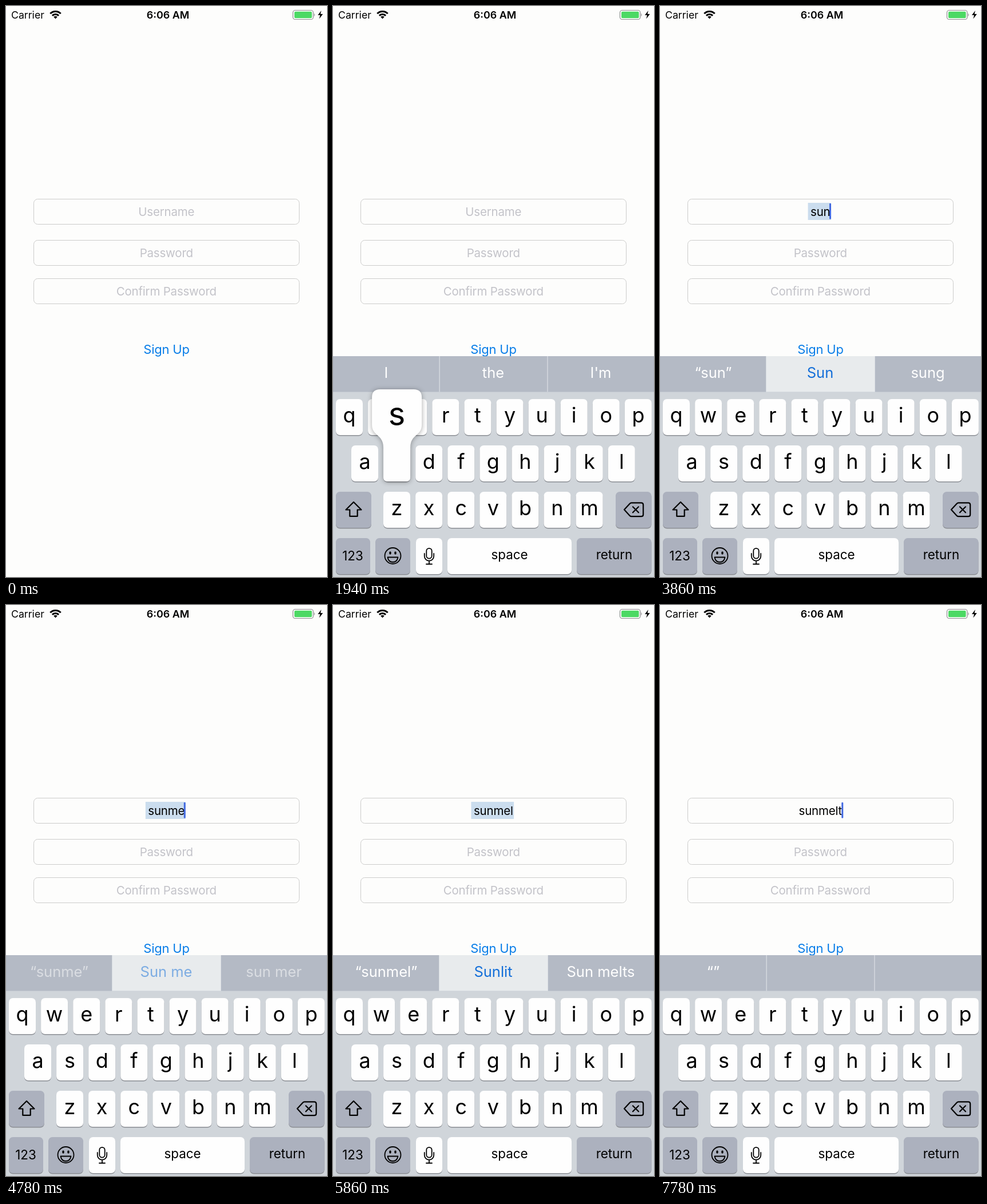
Write an HTML page that moves like this. It is 561x998 px and loops after 8 s.

```html
<!DOCTYPE html>
<html lang="en">
<head>
<meta charset="utf-8">
<title>Sign up form</title>
<style>
  html, body { margin: 0; width: 100%; height: 100%; overflow: hidden; background: #fdfdfc; }
  svg { display: block; }
  text { font-family: Inter, Roboto, sans-serif; text-anchor: middle; white-space: pre; }
  .field { fill: none; stroke: #cccccb; stroke-width: 1; }
  .input { font-size: 20.5px; letter-spacing: -.01em; }
  .letter { font-size: 36px; font-weight: 380; }
  .label { font-size: 22.4px; }
  .word { font-size: 25.5px; font-weight: 400; }
  .icon { fill: none; stroke: #000; stroke-width: 2.2; stroke-linejoin: round; stroke-linecap: round; }
  .popup { filter: drop-shadow(0 1px 4px rgba(0, 0, 0, .35)); }
</style>
</head>
<body>
<svg id="stage" width="561" height="998" viewBox="0 0 561 998"></svg>
<script>
const LOOP = 8000;
const WHITE = '#fefefe', GRAY = '#acb1be', HINT = '#c3c3c9';
const PITCH = 56.1, KEY_W = 47, KEY_H = 63;

// Letter keys: characters, left edge, top edge
const ROWS = [['qwertyuiop', 5, 687], ['asdfghjkl', 32, 768], ['zxcvbnm', 88, 849]];

// Key presses: time down, key
const PRESSES = [[1940, 's'], [2460, 'u'], [3400, 'n'], [4040, 'm'], [4600, 'e'], [5000, 'l'], [6060, 't']];
const HOLD = 100;
const RETURN = [6580, 6680];

// Suggestion bar: time, left, middle, right, middle is active
const BAR = [
  [0, 'I', 'the', "I'm"],
  [2040, '“s”', 'so', 'she'],
  [2560, '“su”', 'such', 'sure'],
  [3500, '“sun”', 'Sun', 'sung', true],
  [4140, '“sunm”', 'Sunny', 'sum', true],
  [4700, '“sunme”', 'Sun me', 'sun mer', true],
  [5100, '“sunmel”', 'Sunlit', 'Sun melts', true],
  [6160, '“sunmelt”', '', ''],
  [6900, '“”', '', '']
];

// Keyboard slide: time, distance below its resting place
const SLIDE = [[0, 400], [500, 300], [600, 90], [700, 27], [820, 0]];

// Moments at which the caret blink starts over
const CARET = [500, ...PRESSES.map(p => p[0] + HOLD), 6660];

const last = (list, t) => list.filter(item => item[0] <= t).pop();
const clamp = (v, lo, hi) => Math.min(hi, Math.max(lo, v));

const text = (x, y, s, cls, fill = '#000', extra = '') =>
  `<text x="${x}" y="${y}" class="${cls}" fill="${fill}" ${extra}>${s}</text>`;

const rect = (x, y, w, h, fill, r = 0, extra = '') =>
  `<rect x="${x}" y="${y}" width="${w}" height="${h}" rx="${r}" fill="${fill}" ${extra}/>`;

const key = (x, y, w, fill = WHITE, id = '') =>
  rect(x, y + 1.6, w, KEY_H, '#8b8e94', 7) + rect(x, y, w, KEY_H, fill, 7, id && `id="${id}"`);

const field = y => rect(48.5, y + .5, 464, 44, 'none', 7, 'class="field"');

function letterKeys() {
  return ROWS.map(([chars, left, y]) => [...chars].map((c, i) => {
    const x = left + i * PITCH;
    return key(x, y, KEY_W) + text(x + KEY_W / 2, y + 40.5, c, 'letter');
  }).join('')).join('');
}

function statusBar() {
  return text(9, 22, 'Carrier', '', '#000', 'style="text-anchor:start;font-size:17.7px"')
    + `<g fill="none" stroke="#000" stroke-width="3">
        <path d="M77.3 13.2a13 13 0 0 1 18.4 0M80.9 16.9a8 8 0 0 1 11.2 0"/>
        <path d="M86.5 22.5l-3.2-3.4a4.6 4.6 0 0 1 6.4 0z" fill="#000" stroke="none"/></g>`
    + text(283, 22, '6:06 AM', '', '#000', 'style="font-size:17.9px;font-weight:600"')
    + rect(501.5, 7.5, 35.5, 16, 'none', 4, 'stroke="#8d8d8f" stroke-width="1.2"')
    + rect(504, 9.8, 30.6, 11.4, '#4cd964', 2)
    + '<path d="M538.5 12.5q2.5 3 0 6z" fill="#8d8d8f"/>'
    + '<path d="M551 8l-6 8h4l-1.6 6.5 6.4-8.5h-4.2z"/>';
}

function controlKeys() {
  const y = 930;
  return key(5, 849, 62, GRAY) + key(494, 849, 62.5, GRAY)
    + key(5, y, 60, GRAY) + text(34.5, 969, '123', 'label')
    + key(74, y, 61, GRAY) + key(145, y, 46)
    + key(200, y, 217) + text(308.5, 967, 'space', 'label')
    + key(426, y, 130.5, GRAY, 'return') + text(491.5, 967, 'return', 'label');
}

function icons() {
  return `<g class="icon">
      <path d="M36 867l13.5 13.5h-6.8v11.3h-13.4v-11.3h-6.8z"/>
      <path d="M509 880.3l9.5-10.4q1.4-1.5 3.2-1.5h17q3.5 0 3.5 3.5v16.8q0 3.5-3.5 3.5h-17q-1.8 0-3.2-1.5zM524 875.3l10 10m0-10l-10 10"/>
      <circle cx="104.5" cy="961" r="14" stroke-width="1.8"/>
      <path d="M95.5 963.5h18q-1.5 8.5-9 8.5t-9-8.5z" stroke-width="1.8"/>
      <path d="M163.3 952.5a4.7 4.7 0 0 1 9.4 0v8.5a4.7 4.7 0 0 1-9.4 0zM159.8 957v4.5a8.2 8.2 0 0 0 16.4 0v-4.5M168 970v5.5m-5 0h10" stroke-width="1.8"/>
    </g>
    <ellipse cx="100" cy="956" rx="1.8" ry="2.8"/><ellipse cx="109" cy="956" rx="1.8" ry="2.8"/>`;
}

const stage = document.getElementById('stage');
stage.innerHTML = rect(0, 0, 561, 998, '#fdfdfc') + statusBar()
  + [337, 409, 476].map(field).join('')
  + rect(0, 344, 0, 30, '#cbddee', 0, 'id="mark"')
  + text(280.3, 367, 'Username', 'input', HINT, 'id="user"')
  + text(280.3, 439, 'Password', 'input', HINT)
  + text(280.3, 506, 'Confirm Password', 'input', HINT)
  + rect(0, 345, 3, 27.5, '#4269e0', 1, 'id="caret"')
  + text(280.5, 607.5, 'Sign Up', '', '#087de8', 'style="font-size:22px;letter-spacing:-.01em"')
  + '<g id="board">'
  + rect(0, 612, 561, 400, '#d0d5da') + rect(0, 612, 561, 62.5, '#b4bac5')
  + rect(185.5, 612, 1.3, 62.5, '#dadde3') + rect(374.3, 612, 1.3, 62.5, '#dadde3')
  + rect(185.5, 612, 190, 62.5, '#e8ebed', 0, 'id="active"')
  + [93, 280, 468].map((x, i) => text(x, 650, '', 'word', '#fff', `id="word${i}"`)).join('')
  + letterKeys() + controlKeys() + icons()
  + `<g id="popup" class="popup"><path fill="${WHITE}"/>`
  + text(0, 0, '', '', '#000', 'style="font-size:56px;font-weight:380"') + '</g></g>';

const el = {};
stage.querySelectorAll('[id]').forEach(node => el[node.id] = node);
const set = (node, attrs) => Object.entries(attrs).forEach(([k, v]) => node.setAttribute(k, v));
const show = (node, on) => node.style.display = on ? '' : 'none';
const write = (node, s) => { if (node.textContent !== s) node.textContent = s; };

function drawPopup(char) {
  show(el.popup, char);
  if (!char) return;
  const [chars, left, y] = ROWS.find(row => row[0].includes(char));
  const kl = left + chars.indexOf(char) * PITCH, kr = kl + KEY_W;
  const bl = clamp(kl - 20, 3, 471), br = bl + 87, top = y - 98;
  const [shape, label] = el.popup.children;
  set(shape, { d: `M${bl + 14} ${top}H${br - 14}q14 0 14 14V${y - 36}
    C${br} ${y - 16} ${kr} ${y - 20} ${kr} ${y + 4}V${y + 56}q0 7-7 7H${kl + 7}q-7 0-7-7V${y + 4}
    C${kl} ${y - 20} ${bl} ${y - 16} ${bl} ${y - 36}V${top + 14}q0-14 14-14z` });
  set(label, { x: (bl + br) / 2, y: top + 63 });
  write(label, char);
}

function drawInput(t, marked) {
  const typed = PRESSES.filter(p => p[0] + HOLD <= t).map(p => p[1]).join('');
  write(el.user, typed || 'Username');
  set(el.user, { fill: typed ? '#000' : HINT });

  const w = el.user.getComputedTextLength(), l = 280.3 - w / 2, r = l + w;
  show(el.mark, marked);
  set(el.mark, { x: l - 4.5, width: w + 6 });
  set(el.caret, { x: !typed ? l - 4 : marked ? r - 1.5 : r - .8, opacity: caretAlpha(t) });
}

function caretAlpha(t) {
  if (t < 500 || (t >= 1940 && t < 2040)) return 0;
  const age = t - CARET.filter(c => c <= t).pop(), p = age % 1040;
  if (p >= 520) return clamp((600 - p) / 80, 0, 1);
  return age < 1040 ? 1 : clamp(p / 80, 0, 1);
}

function draw(t) {
  set(el.board, { transform: `translate(0 ${last(SLIDE, t)[1]})` });

  const [since, ...words] = last(BAR, t), active = !!words[3];
  const alpha = since ? clamp((t - since) / 160, 0, 1) : 1;
  show(el.active, active);
  for (let i = 0; i < 3; i++) {
    write(el['word' + i], words[i]);
    set(el['word' + i], { opacity: alpha, fill: active && i === 1 ? '#146fd9' : '#fff' });
  }

  const press = PRESSES.find(p => t >= p[0] && t < p[0] + HOLD);
  drawPopup(press && press[1]);
  set(el.return, { fill: t >= RETURN[0] && t < RETURN[1] ? WHITE : GRAY });
  drawInput(t, active);
}

const start = performance.now();
function tick() {
  draw((performance.now() - start) % LOOP);
  requestAnimationFrame(tick);
}
tick();
</script>
</body>
</html>
```
